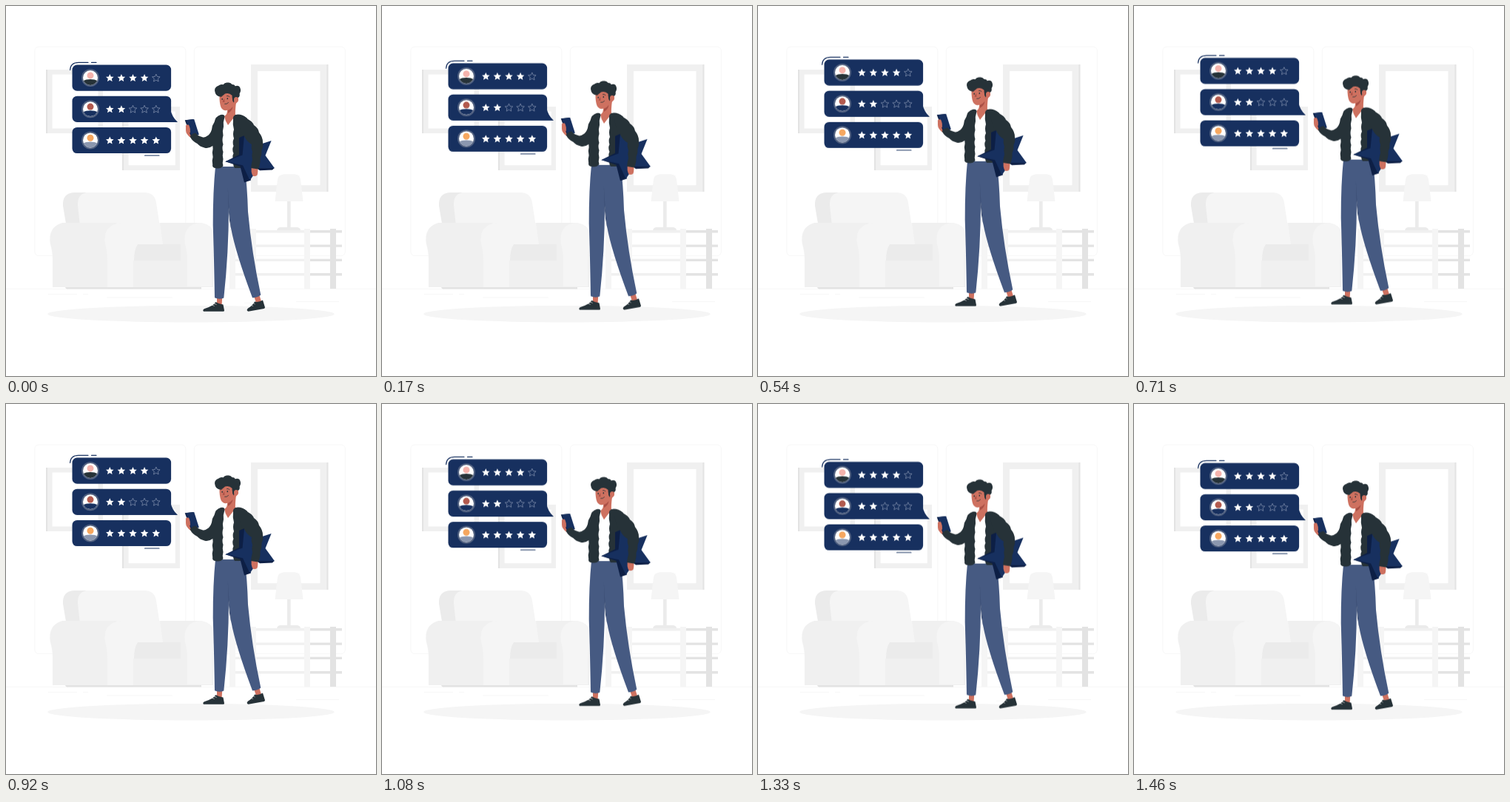
These frames come from a looping animation (500x500 px, 1.5 s). An HTML page without scripts:

```html
<!DOCTYPE html>
<html lang="en">
<head>
<meta charset="utf-8">
<title>Reviews</title>
<style>
  html, body { margin: 0; width: 100%; height: 100%; overflow: hidden; background: #fff; }
  svg { display: block; width: 100vw; height: 100vh; }

  .floating { animation: float 1.5s -5ms infinite; }
  /* 24 steps per second: ten pixels up, ten pixels down */
  @keyframes float {
    0% { transform: translateY(0); animation-timing-function: steps(18, end); }
    49.999% { transform: translateY(-10px); animation-timing-function: step-end; }
    50% { transform: translateY(-9.2px); animation-timing-function: steps(18, end); }
    100% { transform: translateY(.8px); }
  }

  .navy { fill: #17305f; }
  .deep { fill: #0d1f45; }
  .dark { fill: #263238; }
  .skin { fill: #ce7160; }
  .white { fill: #fff; }
  .g1 { fill: #f5f5f5; }
  .g2 { fill: #f0f0f0; }
  .g3 { fill: #ebebeb; }
  .g4 { fill: #e3e3e3; }
  .hair-line { fill: none; stroke: #ebebeb; stroke-width: .4; }
  .accent { fill: none; stroke: #17305f; stroke-width: 1.1; stroke-linecap: round; }
  .pen { fill: none; stroke: #263238; stroke-width: .8; stroke-linecap: round; }
  .lace { fill: none; stroke: #e8e8e8; stroke-width: .7; }
  .empty { fill: none; stroke: #7f8eac; stroke-width: .8; }
</style>
</head>
<body>
<svg viewBox="0 0 500 500">
  <defs>
    <clipPath id="disc"><circle cx="114" cy="17.5" r="9.9"/></clipPath>
    <path id="star" stroke-linejoin="round" d="M0-5.5 1.55-2.05 5.3-1.7 2.5.8 3.3 4.5 0 2.6-3.3 4.5-2.5.8-5.3-1.7-1.55-2.05Z"/>
    <g id="card">
      <rect class="navy" x="89.5" width="133.6" height="35.2" rx="6.5"/>
      <circle cx="114" cy="17.5" r="12" fill="#506080"/>
      <circle class="white" cx="114" cy="17.5" r="10"/>
      <g clip-path="url(#disc)">
        <path style="fill:var(--top)" d="M102 30V23Q106 19.6 114 19.6T126 23V30Z"/>
        <circle style="fill:var(--face)" cx="114" cy="14.4" r="4.5"/>
      </g>
      <g class="white">
        <use href="#star" x="140.3" y="18"/>
        <use href="#star" x="155.9" y="18"/>
      </g>
    </g>
  </defs>

  <g id="room">
    <rect class="hair-line" x="38.8" y="55" width="204" height="282.6" rx="5.6"/>
    <rect class="hair-line" x="254.4" y="55" width="204" height="282.6" rx="5.6"/>
    <path class="hair-line" d="M0 382.4H500M57 389.5H96M104 389.5H111M136 394H225M392 399.5H450M322 401.3H331"/>

    <path class="g4" d="M54 86H57V172H54ZM157 136H160V222H157Z"/>
    <path class="g2" fill-rule="evenodd" d="M56 86H131V172H56ZM62.5 92.5V165.5H124.5V92.5ZM159 136H235V222H159ZM165.5 142.5V215.2H228.7V142.5Z"/>
    <path class="g4" d="M432 79H435.5V251H432Z"/>
    <path class="g2" fill-rule="evenodd" d="M331 79H433.5V251H331ZM340 88V242.3H424.5V88Z"/>

    <g id="sofa">
      <path class="g4" d="M80 379H264V382.6H82Q80 382 80 379Z"/>
      <path class="g3" d="M108 252H92Q76 253 77 270L82 300H120Z"/>
      <path class="g1" d="M112 252H187Q201 252 203 266L212 324V350H106L97 270Q96 252 112 252Z"/>
      <path class="g2" d="M76 293H150V380H63V345Q63 332 60 322Q56 299 76 293Z"/>
      <path class="g2" d="M207 293H262Q279 295 280 309V380H172V344H213Z"/>
      <path class="g1" d="M262 293Q284 294 281 322Q278 332 278 348V379H245V345Q245 332 242 322Q238 295 262 293Z"/>
      <path class="g1" d="M155 293H208L212 322H178Q172 330 172 346V380H137V345Q137 332 134 322Q130 296 155 293Z"/>
      <path class="g3" d="M178 322H236V344H173Q173 329 178 322Z"/>
      <path class="g2" d="M172 345H245V380H172Z"/>
    </g>

    <g id="shelf">
      <path class="g4" d="M411 303H454V306.5H411ZM411 322.4H454V325.8H411ZM411 341.7H454V345.1H411ZM411 361H454V364.4H411ZM438 301H446V382H438Z"/>
      <path class="g2" d="M302 303H404V306.5H302ZM302 322.4H404V325.8H302ZM302 341.7H404V345.1H302ZM302 361H404V364.4H302Z"/>
      <path class="g1" d="M302 301H310V382H302ZM330 301H338V382H330ZM403 301H411V382H403Z"/>
    </g>
    <path class="g3" d="M380 263H384.7V299H394Q398 300 398 303H366Q367 299 371 299H380Z"/>
    <path class="g1" d="M376 227.3H390Q397 228 398 234L401.5 264H363.5L367 234Q368 228 376 227.3Z"/>

    <ellipse class="g1" cx="250" cy="416.2" rx="193.9" ry="11.3"/>
  </g>

  <g class="floating">
    <g id="reviews">
      <path class="accent" d="M86.6 86.5Q87 76.4 98 76.4H111M115.5 76.4H122M187.5 202H207"/>
      <g transform="translate(0 79.5)">
        <use href="#card" style="--face:#f5b3ac;--top:#263238"/>
        <g class="white"><use href="#star" x="171.5" y="18"/><use href="#star" x="187.1" y="18"/></g>
        <use class="empty" href="#star" x="202.8" y="18"/>
      </g>
      <g transform="translate(0 121.7)">
        <path class="navy" d="M222 17Q224 28 232 35.2H208Z"/>
        <use href="#card" style="--face:#b25a4e;--top:#17305f"/>
        <g class="empty"><use href="#star" x="171.5" y="18"/><use href="#star" x="187.1" y="18"/><use href="#star" x="202.8" y="18"/></g>
      </g>
      <g transform="translate(0 163.9)">
        <use href="#card" style="--face:#f6a75f;--top:#8b97af"/>
        <g class="white"><use href="#star" x="171.5" y="18"/><use href="#star" x="187.1" y="18"/><use href="#star" x="202.8" y="18"/></g>
      </g>
    </g>

    <g id="man">
      <path class="skin" d="M285 393H292.3L291.5 405H285ZM335 392L342 389.5 345.5 401 339 404Z"/>
      <path class="dark" d="M283.5 400Q288 403 293.5 403.5L295 411.5Q295 412.8 293.5 412.8H267Q265 410.5 268.5 409Q279 406 283.5 400Z"/>
      <path class="dark" d="M336 399.5Q341 401 347 397.5L350 407.3Q350 408.5 348.5 409L327.5 412.7Q324 411.5 327 408.5Q333 405 336 399.5Z"/>
      <path class="lace" d="M278 404.5Q281 404 281.5 406M281 402.5Q284 402 284.5 404M330.5 405Q333 404 334 405.8M333 402Q335.5 401.2 336.5 403"/>

      <path class="white" d="M291 150L308 147 316 219H286Z"/>
      <path fill="#465a82" d="M283 217H322.5Q326 243 327 278Q332 333 344.3 390.5Q339 394.5 333 394.3Q310 333 304 300L301 272Q301 333 294.3 394.5Q288 397 282 394.3Q281 335 279.7 296Q279.6 250 283 217Z"/>
      <path fill="#394b70" d="M299.8 246Q301 275 304.5 303L302 290 300.8 275Z"/>

      <path class="skin" d="M299 136L311 130Q309.5 142 310 148L300 161Q296 155 295 149Q300 147 299 136Z"/>
      <path class="dark" d="M310 147Q318 145 326 152L324 185Q322 205 318 219H309Q306 215 308 209Q305 204 307.5 199Q305 194 307.5 189Q305.5 184 308 179Q306 173 308 167Q306 160 307 154Q306 149 310 147Z"/>

      <g id="trophy">
        <path class="deep" d="M296.3 210.3L315 201V178L322 175 333 185 327 219 331 235.5 322 238.5 316.5 216.8ZM336 217L362.7 218.8 360 221.5 343 222.3Z"/>
        <path class="navy" d="M296.3 210.3L319.5 201.5 322 175 337 189 358.6 182 350.5 202 363 219.3 341 219 329.5 235.8 320 215.3Z"/>
      </g>

      <path class="skin" d="M332 217H340Q341 224 339.5 228.5Q337 231 333.5 229.5Q330.5 224 332 217Z"/>
      <path class="dark" d="M313 149Q320 146 327 153Q333 156 335 161Q341 165 342 171Q347 177 347 184Q348 190 345.5 195Q346 201 343.5 206Q344 213 341 220.5L331 219Q331.5 213 333 208Q331.5 202 333 197Q331 191 332 187Q325 183 322 176Q315 169 313 149Z"/>

      <path class="skin" d="M243 162Q246 159.5 249 162.5L252 172 249.5 178Q243 173 243 168Z"/>
      <path class="deep" d="M241.7 154.3L253 153 260.4 174 250 176.3Z"/>
      <path class="navy" d="M243.2 154.2L254.2 153 260.8 173.8 250.8 176Z"/>
      <path class="skin" d="M242.8 162Q245 159 247.5 161.5Q249.5 166 249 171.5Q244.5 170 242.8 162Z"/>
      <path class="dark" d="M290 147Q297 146 295 152Q293 157 294 163Q292 169 293.5 175Q291.5 181 293.5 187Q291.5 192 293.5 197Q292 202 293.5 207Q292 212 293.5 216Q290 220.5 284 219.3Q278 219 279.2 214Q278 209 279.6 204Q278 198 279.6 193L279.3 189Q273 193.5 268 191.5Q262 190 258.5 186Q252 183 248.6 176.5Q251.5 172 256.2 171.5Q260 176 265 177Q268 178.5 272 175.5Q276 173.5 278 167Q278.5 161 281.5 157Q283 149 290 147Z"/>

      <g id="head">
        <path class="skin" d="M289 116Q287.8 126 289.6 134Q291 141 297 141.2Q304 140.5 308 133.5Q314 131 314 125L309 113H291Z"/>
        <path class="dark" d="M288.5 122.5Q283 121 282.3 115.5Q281 110 287 107.7Q290 105 293.5 106.3Q296 102.6 300 103.6Q303.5 103 305.5 106Q309 106 309.5 108.3Q315 106.5 316.5 111Q318 115 315.6 118.5Q316.5 123 313 124Q309.5 122.5 308.6 126Q308.8 129.5 307.5 130.5Q305.5 127 305.8 121Q301 116.5 296 118.5Q292 122.5 288.5 122.5Z"/>
        <ellipse class="skin" cx="311" cy="126.6" rx="3" ry="3.5"/>
        <path class="dark" d="M308.8 121.5Q306.5 125 307.6 130.5Q305.3 127 305.8 120Z"/>
        <ellipse class="dark" cx="292.2" cy="125.8" rx=".8" ry="1.1"/>
        <ellipse class="dark" cx="299.3" cy="125.2" rx=".8" ry="1.1"/>
        <path class="pen" d="M290 122.7L292 121.8M298.5 121.5Q300.5 121 302 122.6M295.7 132.4Q298.5 133 300.5 130.6"/>
        <path fill="#a94f45" d="M295 125Q293.3 128 292.7 129.3Q294 130.4 295.4 129.8Z"/>
        <path fill="#a94f45" d="M300 141Q304 139.3 306.5 136Q305.5 142 300 145Z"/>
      </g>
    </g>
  </g>
</svg>
</body>
</html>
```
